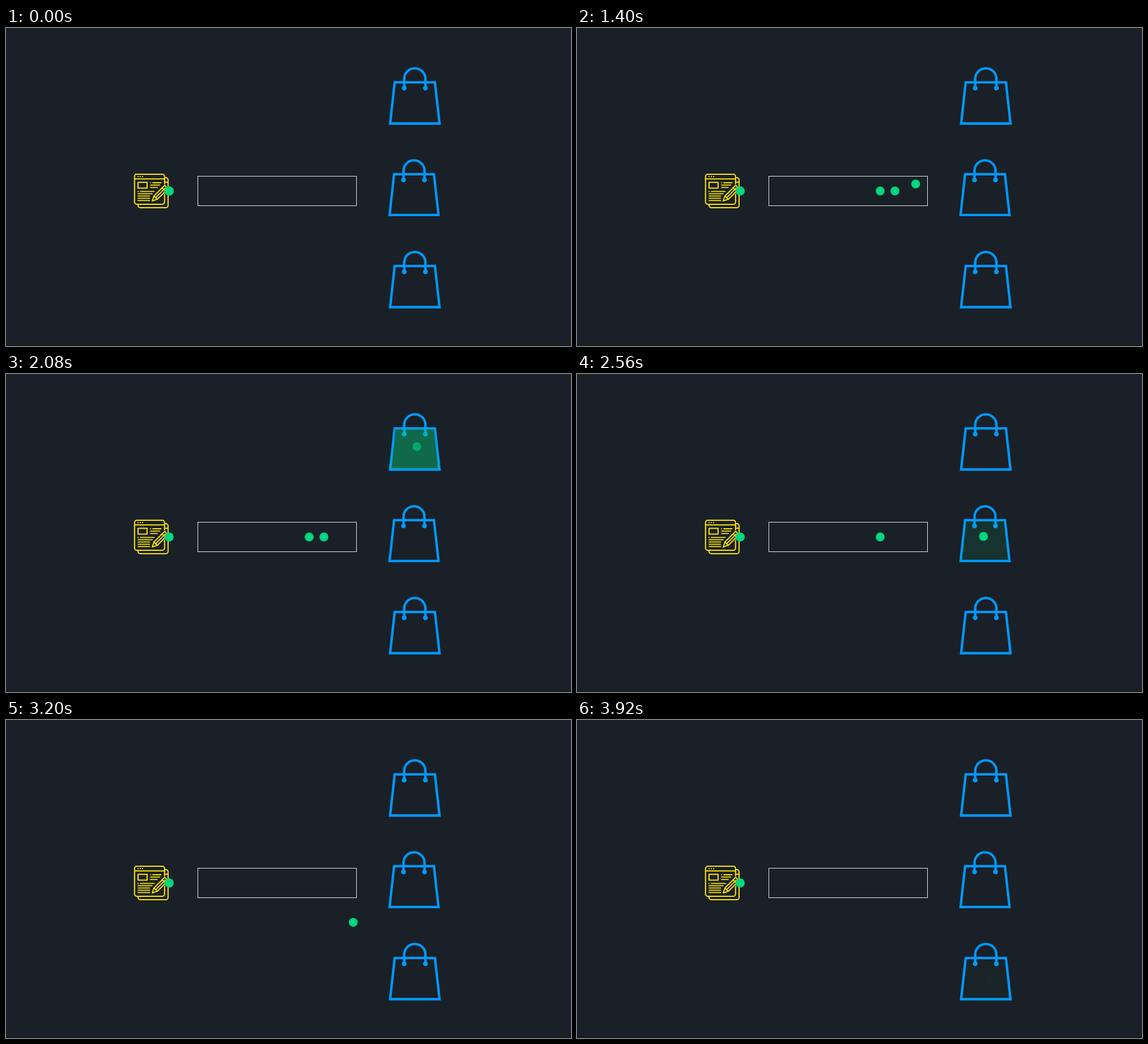
An HTML page with a canvas for the animation above (4440 ms loop, 997 by 561 pixels).

```html
<!DOCTYPE html>
<html lang="en">
<head>
<meta charset="utf-8">
<title>Queue to bags</title>
<style>
html, body { margin: 0; width: 100%; height: 100%; overflow: hidden; background: #1a2027; }
canvas { display: block; }
</style>
</head>
<body>
<canvas id="stage" width="997" height="561"></canvas>
<script>
const ctx = document.getElementById('stage').getContext('2d');
const BG = '#1a2027', BLUE = '#0099ff', GREEN = '#00d67f', YELLOW = '#ffe600';
const LOOP = 4440, STEP = 40, START = 480, SLOT = 288, LAST = 3906;
const HOME = { x: 288, y: 287.5 };
const bags = [
  { x: 0, y: 0, scale: 1 },
  { x: -1.4, y: 162, scale: 0.99 },
  { x: 0, y: 324, scale: 1 }
];
const items = [
  { wait: 587, x: 725, y: 128 },
  { wait: 561, x: 717.3, y: 286.5 },
  { wait: 535, x: 727, y: 459 }
];

// cubic-bezier(.42, 0, .58, 1), solved by bisection
function ease(u) {
  if (u <= 0) return 0;
  if (u >= 1) return 1;
  let lo = 0, hi = 1, s = 0.5;
  for (let i = 0; i < 24; i++) {
    s = (lo + hi) / 2;
    const r = 1 - s;
    const x = 3 * r * r * s * 0.42 + 3 * r * s * s * 0.58 + s * s * s;
    if (x < u) lo = s; else hi = s;
  }
  return s * s * (3 - 2 * s);
}

const slot = (t, n) => ease((t - START - n * SLOT) / SLOT);
const mix = (a, b, k) => a + (b - a) * k;

function path(points, close) {
  ctx.beginPath();
  points.forEach(([x, y], i) => i ? ctx.lineTo(x, y) : ctx.moveTo(x, y));
  if (close) ctx.closePath();
}

function line(...points) {
  path(points);
  ctx.stroke();
}

function disc(x, y, r) {
  ctx.beginPath();
  ctx.arc(x, y, r, 0, Math.PI * 2);
  ctx.fill();
}

function dot(x, y, alpha = 1) {
  ctx.globalAlpha = alpha;
  ctx.fillStyle = '#08a868';
  disc(x, y, 8);
  ctx.fillStyle = GREEN;
  disc(x, y, 7.4);
  ctx.globalAlpha = 1;
}

function inBag(bag, draw) {
  ctx.save();
  ctx.translate(721.4 + bag.x, 95.8 + bag.y);
  ctx.scale(bag.scale, bag.scale);
  draw();
  ctx.restore();
}

function drawBag() {
  ctx.strokeStyle = ctx.fillStyle = BLUE;
  ctx.lineWidth = 4.3;
  ctx.lineJoin = 'miter';
  path([[-35.5, 0], [35.5, 0], [43.6, 72.7], [-43.6, 72.7]], true);
  ctx.stroke();
  ctx.beginPath();
  ctx.moveTo(-18.7, 10);
  ctx.arc(0, -6, 18.7, Math.PI, 0);
  ctx.lineTo(18.7, 10);
  ctx.stroke();
  disc(-18.7, 10.2, 4.3);
  disc(18.7, 10.2, 4.3);
}

function drawFill(alpha) {
  ctx.globalAlpha = alpha;
  ctx.fillStyle = GREEN;
  path([[-32.5, 1.4], [33, 1.4], [44, 71.4], [-44, 71.4]], true);
  ctx.fill();
  ctx.globalAlpha = 1;
}

function drawIcon() {
  ctx.strokeStyle = ctx.fillStyle = YELLOW;
  ctx.lineWidth = 2;
  ctx.lineJoin = ctx.lineCap = 'round';

  // back page
  ctx.beginPath();
  ctx.moveTo(280, 264);
  ctx.arcTo(286, 264, 286, 270, 4);
  ctx.arcTo(286, 317, 280, 317, 4);
  ctx.arcTo(233, 317, 233, 311, 4);
  ctx.lineTo(233, 311);
  ctx.stroke();
  line([280, 272], [286, 272]);

  // front page
  ctx.beginPath();
  ctx.roundRect(226.8, 258, 53, 53, 4);
  ctx.stroke();
  line([227, 266.3], [279.5, 266.3]);
  for (const x of [233, 237, 241]) disc(x, 262.2, 1.1);
  ctx.strokeRect(233, 272.2, 16, 10.3);

  const rows = [
    [259, 273.5, 273], [255, 271.5, 277.2], [255, 267, 281.4],
    [237, 261.5, 288.4], [233, 258, 292.4], [233, 253.5, 296.4],
    [233, 253.5, 300.4], [233, 253.5, 304.4]
  ];
  ctx.lineWidth = 1.8;
  for (const [x1, x2, y] of rows) line([x1, y], [x2, y]);
  disc(255.2, 273, 1.1);
  disc(233, 288.4, 1.1);

  // pencil
  path([[258, 305], [261, 296.5], [280, 277.5], [286, 283.5], [267, 302.2]], true);
  ctx.strokeStyle = BG;
  ctx.lineWidth = 4;
  ctx.stroke();
  ctx.fillStyle = BG;
  ctx.fill();
  ctx.strokeStyle = YELLOW;
  ctx.lineWidth = 1.9;
  ctx.stroke();
  line([261, 296.5], [264, 299.3], [267, 302.2]);
  line([264, 299.3], [281, 282.3]);
  line([275.5, 282], [281.2, 287.8]);
}

function render(now) {
  const t = Math.min(Math.floor((now % LOOP) / STEP) * STEP, LAST);
  ctx.fillStyle = BG;
  ctx.fillRect(0, 0, 997, 561);
  ctx.fillStyle = '#0c0f13';
  ctx.fillRect(0, 560, 997, 1);

  ctx.lineJoin = 'miter';
  ctx.lineWidth = 1;
  ctx.strokeStyle = '#e8e9ea';
  ctx.strokeRect(338.5, 261.5, 280, 52);
  drawIcon();
  for (const bag of bags) inBag(bag, drawBag);

  items.forEach((item, i) => {
    const n = 3 + i * 3;
    const queue = slot(t, i), go = slot(t, n);
    const show = slot(t, n + 1), gone = slot(t, n + 2);
    const x = mix(mix(HOME.x, item.wait, queue), item.x, go);
    dot(x, mix(HOME.y, item.y, go), 1 - gone);
    const alpha = show * (1 - gone);
    if (alpha > 0) inBag(bags[i], () => drawFill(alpha));
  });

  ctx.fillStyle = GREEN;
  disc(HOME.x, HOME.y, 8);
}

let begin = null;
function tick(now) {
  if (begin === null) begin = now;
  render(now - begin);
  requestAnimationFrame(tick);
}
render(0);
requestAnimationFrame(tick);
</script>
</body>
</html>
```
